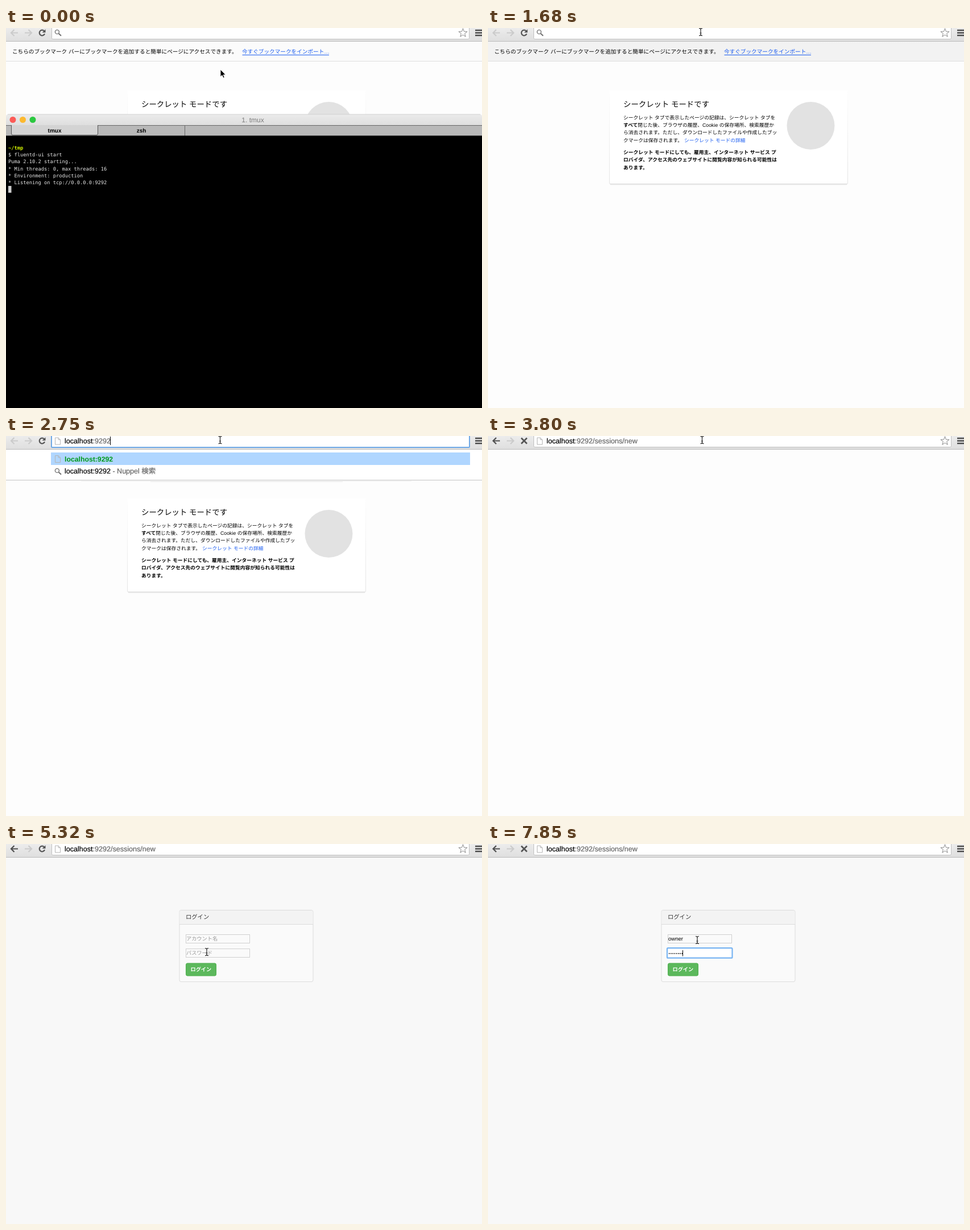
Animation, 837 px wide and 669 px high, one loop 8 s. Source, as an HTML page:

```html
<!DOCTYPE html>
<html lang="ja">
<head>
<meta charset="utf-8">
<title>Sign-in demo</title>
<style>
  html, body { margin: 0; width: 100%; height: 100%; overflow: hidden; background: #fdfdfd; }
  svg { display: block; width: 837px; height: 669px; }
  text { font-family: "Liberation Sans", "Noto Sans CJK JP", "Noto Sans CJK", sans-serif; text-rendering: geometricPrecision; white-space: pre; }
  .mono text { font: 8.72px "DejaVu Sans Mono", monospace; fill: #e6e6e6; }
  .bar { font-size: 9.63px; }
  .body { font-size: 8.75px; }
  .url { font-size: 12.55px; stroke: #000; stroke-width: .2; }
  .form { font-size: 9.2px; }
  .secret { font-size: 6.6px; letter-spacing: .9px; }
  .bold { font-weight: bold; }
  .tab { font-size: 10px; font-weight: bold; text-anchor: middle; }
  .link { fill: #1a5cf0; }
  .dim { fill: #666; stroke: #666; }
  .hint { fill: #999; }
  .line { fill: none; stroke-width: 2.2; }
  .ring { fill: #fff; stroke: #78b4f2; stroke-width: 2.2; }
  .field { fill: #fafafa; stroke: #d0d0d0; }
  .caret { stroke: #000; }
</style>
</head>
<body>
<svg viewBox="0 0 837 669">
  <defs>
    <linearGradient id="chrome" x2="0" y2="1"><stop stop-color="#ececec"/><stop offset="1" stop-color="#dedede"/></linearGradient>
    <linearGradient id="title" x2="0" y2="1"><stop stop-color="#ebebeb"/><stop offset="1" stop-color="#d2d2d2"/></linearGradient>
    <linearGradient id="side" x2="0" y2="1"><stop stop-color="#e4e4e4" stop-opacity="0"/><stop offset="1" stop-color="#e4e4e4"/></linearGradient>
    <g id="arrow"><path d="M14 8.5H2M7.5 3L2 8.5L7.5 14" class="line"/></g>
    <g id="page"><path d="M.5.5H6L9.5 4V12.5H.5ZM6 .5V4H9.5" fill="none" stroke="#b4b4b4"/></g>
    <g id="lens" fill="none" stroke="#707070"><circle cx="4.4" cy="4.4" r="3.5" stroke-width="1.4"/><path d="M7.2 7.2L11.5 11.3" stroke-width="2"/></g>
  </defs>

  <rect width="837" height="669" fill="#fdfdfd"/>

  <g id="newTab">
    <rect x="213" y="112" width="1" height="162" fill="url(#side)"/>
    <rect x="632" y="112" width="1" height="162" fill="url(#side)"/>
    <rect x="214" y="110" width="418" height="164" fill="#fff"/>
    <path d="M214 274.5H632" stroke="#d8d8d8"/>
    <path d="M215 275.8H631" stroke="#ececec" stroke-width="1.5"/>
    <text x="238" y="139" font-size="13.4">シークレット モードです</text>
    <g class="body">
      <text x="238" y="161.3">シークレット タブで表示したページの記録は、シークレット タブを</text>
      <text x="238" y="174.3"><tspan class="bold">すべて</tspan>閉じた後、ブラウザの履歴、Cookie の保存場所、検索履歴か</text>
      <text x="238" y="187.4">ら消去されます。ただし、ダウンロードしたファイルや作成したブッ</text>
      <text x="238" y="200.5">クマークは保存されます。<tspan class="link" x="345">シークレット モードの詳細</tspan></text>
      <g class="bold">
        <text x="238" y="222.3">シークレット モードにしても、雇用主、インターネット サービス プ</text>
        <text x="238" y="235.4">ロバイダ、アクセス先のウェブサイトに閲覧内容が知られる可能性は</text>
        <text x="238" y="248.5">あります。</text>
      </g>
    </g>
    <circle cx="567.5" cy="172" r="42" fill="#e2e2e2"/>
  </g>

  <g id="bookmarks">
    <rect id="bookmarkFill" y="24" width="837" height="35"/>
    <path d="M0 58.5H837" stroke="#dfdfdf"/>
    <text x="11" y="45.3" class="bar">こちらのブックマーク バーにブックマークを追加すると簡単にページにアクセスできます。</text>
    <text x="415" y="45.3" class="bar link">今すぐブックマークをインポート…</text>
    <path d="M415.5 47.5H568" stroke="#1a5cf0"/>
  </g>

  <g id="login">
    <rect y="24" width="837" height="645" fill="#f8f8f8"/>
    <rect x="305" y="116.5" width="235" height="126" rx="3" fill="#fafafa" stroke="#dcdcdc"/>
    <path d="M305.5 141.5V119.5Q305.5 117 308 117H537Q539.5 117 539.5 119.5V141.5" fill="#f3f3f3"/>
    <path d="M305 141.5H540" stroke="#dcdcdc"/>
    <text x="316" y="132.3" font-size="10.3" fill="#333">ログイン</text>
    <rect class="field" x="316.5" y="159.5" width="112" height="15"/>
    <rect class="field" x="316.5" y="184.5" width="112" height="15"/>
    <rect id="accountRing" class="ring" x="315" y="158" width="114.5" height="17.5" rx="1.5"/>
    <rect id="secretRing" class="ring" x="315" y="183.2" width="114.5" height="17.5" rx="1.5"/>
    <text id="accountHint" class="form hint" x="317" y="169.6">アカウント名</text>
    <text id="secretHint" class="form hint" x="317" y="195">パスワード</text>
    <text id="account" x="317" y="169.8" font-size="9.5"></text>
    <text id="secret" class="secret" x="317.6" y="194.5"></text>
    <path id="formCaret" class="caret"/>
    <rect id="button" x="316.5" y="210" width="53" height="22" rx="2.5" stroke="#4cae4c"/>
    <text x="324.5" y="224.2" class="form bold" fill="#fff">ログイン</text>
  </g>

  <g id="dropdown">
    <rect y="24" width="837" height="54" fill="#fff"/>
    <path d="M0 77.5H837" stroke="#cfcfcf"/>
    <path d="M0 78.5H837" stroke="#efefef"/>
    <path d="M132 79.5H713" stroke="#f0f0f0"/>
    <path d="M254 80.5H592" stroke="#ececec"/>
    <rect x="79" y="29" width="737" height="22" fill="#b0d6ff"/>
    <use href="#page" x="86" y="34"/>
    <text x="103" y="44.8" class="bold" font-size="12.25" fill="#009a1a">localhost:9292</text>
    <use href="#lens" x="85.5" y="56.5"/>
    <text x="103" y="66.4" class="url">localhost:9292<tspan class="dim"> - Nuppel 検索</tspan></text>
  </g>

  <g id="toolbar">
    <rect width="837" height="24" fill="url(#chrome)"/>
    <path d="M0 23.5H837" stroke="#bcbcbc"/>
    <path d="M80.5 0V17.5Q80.5 19.5 82.5 19.5H812.5Q814.5 19.5 814.5 17.5V0" fill="#fff" stroke="#c0c0c0"/>
    <path id="urlRing" d="M80 -2V18.5Q80 20 81.5 20H813.5Q815 20 815 18.5V-2" fill="#fff" stroke="#6fa9e6" stroke-width="2"/>
    <use id="back" href="#arrow" x="7" y="0"/>
    <use href="#arrow" stroke="#cbcbcb" transform="translate(47 0) scale(-1 1)"/>
    <g id="reload">
      <path d="M67.2 5.4A4.8 4.8 0 1 0 68 10.2" class="line" stroke="#555"/>
      <path d="M69.5 2.2V8H63.7Z" fill="#555"/>
    </g>
    <path id="stop" d="M58.5 3.5L68.5 13.5M68.5 3.5L58.5 13.5" class="line" stroke="#555" style="stroke-width:2.7"/>
    <use id="urlLens" href="#lens" x="85.5" y="2.5"/>
    <use id="urlPage" href="#page" x="86" y="2.5"/>
    <text class="url" y="13"><tspan id="host" x="103"></tspan><tspan id="path" class="dim"></tspan></text>
    <path id="urlCaret" class="caret"/>
    <path id="star" fill="#fff" stroke="#8a8a8a"/>
    <path d="M825 4H837M825 8.5H837M825 13H837" stroke="#4c4c4c" stroke-width="2.6"/>
  </g>

  <g id="terminal">
    <path d="M0 190V156Q0 152 4 152H833Q837 152 837 156V190Z" fill="url(#title)"/>
    <path d="M3 152H834" stroke="#c9c9c9" stroke-width=".8"/>
    <circle cx="12" cy="161.5" r="5.5" fill="#fc5b57"/>
    <circle cx="29.5" cy="161.5" r="5.5" fill="#fcb92f"/>
    <circle cx="47" cy="161.5" r="5.5" fill="#2bc840"/>
    <text x="434" y="166" font-size="12" text-anchor="middle" fill="#7c7c7c">1. tmux</text>
    <rect y="171" width="837" height="19" fill="#b8b8b8"/>
    <path d="M0 171.5H9M162 171.5H837M314.5 171V190" stroke="#686868"/>
    <path d="M9.5 171V186Q9.5 188.5 12 188.5H159Q161.5 188.5 161.5 186V171" fill="#d3d3d3" stroke="#555"/>
    <text x="85.5" y="183.5" class="tab">tmux</text>
    <text x="238" y="183.5" class="tab">zsh</text>
    <rect y="189.5" width="837" height="479.5"/>
    <g class="mono">
      <text x="4" y="214" style="fill:#d8f800;font-weight:bold">~/tmp</text>
      <text x="4" y="226.2">$ fluentd-ui start</text>
      <text x="4" y="238.4">Puma 2.10.2 starting...</text>
      <text x="4" y="250.6">* Min threads: 0, max threads: 16</text>
      <text x="4" y="262.8">* Environment: production</text>
      <text x="4" y="275">* Listening on tcp://0.0.0.0:9292</text>
    </g>
    <rect x="4" y="278" width="5.5" height="12" fill="#ccc"/>
  </g>

  <g id="pointer">
    <path id="tip" d="M0 0V13L3 10.2L5.1 15L7.2 14.1L5.2 9.4H9.2Z" stroke="#fff" stroke-width=".9"/>
    <path id="beam" d="M-3 -6.5Q0 -6.5 0 -4.5Q0 -6.5 3 -6.5M0 -5V5M-3 6.5Q0 6.5 0 4.5Q0 6.5 3 6.5M-1.5 2H1.5" fill="none" stroke="#222" stroke-width="1.2"/>
    <path id="hand" d="M-1 0Q1 -1.5 1.5 1V5L6 6Q8 6.5 7.5 9L6.5 14H0L-4 8.5Q-4 6.5 -1.2 8Z" fill="#fff" stroke="#222"/>
  </g>
</svg>
<script>
const DURATION = 8000;
const $ = id => document.getElementById(id);
const show = (id, on) => { $(id).style.display = on ? '' : 'none'; };

// Each step overrides only what changes at that time.
const steps = [
  [0, { scene: 'terminal', cursor: 'tip', at: [377, 73], host: '', path: '', focus: '' }],
  [150, { at: [386, 66] }],
  [300, { at: [392, 46] }],
  [450, { at: [388, 24] }],
  [600, { at: [379, 8] }],
  [780, { at: [374, 6] }],
  [1230, { at: [373, 5] }],
  [1680, { scene: 'newTab', cursor: 'beam', at: [374, 7] }],
  [1820, { focus: 'url', caret: true }],
  [2000, { at: [376.5, 7] }],
  [2450, { caret: false }],
  [2750, { host: 'localhost', path: ':9292', suggest: true, caret: true }],
  [3350, { suggest: false, focus: '', caret: false, loading: true }],
  [3800, { scene: 'blank', path: ':9292/sessions/new' }],
  [3950, { cursor: 'tip', at: [373, 40] }],
  [4100, { at: [361, 110] }],
  [4240, { at: [345, 188] }],
  [4390, { at: [336, 227] }],
  [4540, { scene: 'login', at: [335, 236] }],
  [4690, { loading: false, at: [335, 239] }],
  [4990, { cursor: 'hand', at: [340, 222], hover: true }],
  [5140, { cursor: 'tip', at: [346, 203], hover: false }],
  [5320, { cursor: 'beam', at: [353, 190] }],
  [5460, { at: [363, 175] }],
  [5610, { at: [368, 169] }],
  [5910, { focus: 'account', caret: true }],
  [6210, { account: 1 }],
  [6360, { account: 3 }],
  [6510, { account: 4 }],
  [6660, { account: 5 }],
  [6810, { focus: 'secret' }],
  [7110, { secret: 2 }],
  [7260, { secret: 3 }],
  [7400, { secret: 5 }],
  [7550, { secret: 6 }],
  [7700, { secret: 8 }],
  [7850, { loading: true }]
];

const starPoint = (_, i) => {
  const r = i % 2 ? 3.3 : 8, a = i * Math.PI / 5;
  return (803.5 + r * Math.sin(a)).toFixed(2) + ' ' + (8.8 - r * Math.cos(a)).toFixed(2);
};
$('star').setAttribute('d', 'M' + Array.from({ length: 10 }, starPoint).join('L') + 'Z');

function placeCaret(id, on, x, y, height) {
  show(id, on);
  $(id).setAttribute('d', `M${Math.floor(x) + .5} ${y}v${height}`);
}

function draw(s) {
  const { scene, focus, account = 0, secret = 0 } = s;
  const terminal = scene === 'terminal';
  const onNewTab = terminal || scene === 'newTab';
  const typing = focus === 'url';

  show('terminal', terminal);
  show('newTab', onNewTab);
  show('bookmarks', onNewTab);
  show('login', scene === 'login');
  show('dropdown', s.suggest);
  $('bookmarkFill').setAttribute('fill', terminal ? '#fbfbfb' : '#f2f2f2');

  show('urlRing', typing);
  show('urlLens', !s.host);
  show('urlPage', s.host);
  show('star', !s.suggest);
  show('stop', s.loading);
  show('reload', !s.loading);
  $('back').setAttribute('stroke', onNewTab ? '#cbcbcb' : '#505050');
  $('host').textContent = s.host;
  $('path').textContent = s.path;
  placeCaret('urlCaret', typing && s.caret, s.host ? 183.5 : 103, 1, 15);

  $('account').textContent = 'owner'.slice(0, account);
  $('secret').textContent = '•'.repeat(secret);
  show('accountHint', !account);
  show('secretHint', !secret);
  show('accountRing', focus === 'account');
  show('secretRing', focus === 'secret');
  $('button').setAttribute('fill', s.hover ? '#449d44' : '#5cb85c');
  const inSecret = focus === 'secret';
  const caretX = inSecret ? 317.2 + secret * 3.22 : 317.2 + account * 5.2;
  placeCaret('formCaret', s.caret && (inSecret || focus === 'account'), caretX, inSecret ? 187 : 161.5, 10.5);

  for (const shape of ['tip', 'beam', 'hand']) show(shape, shape === s.cursor);
  $('pointer').setAttribute('transform', `translate(${s.at})`);
}

const start = performance.now();
let shown = -1;
function tick() {
  const time = (performance.now() - start) % DURATION;
  const past = steps.filter(([at]) => at <= time);
  if (past.length !== shown) {
    shown = past.length;
    draw(Object.assign({}, ...past.map(([, change]) => change)));
  }
  requestAnimationFrame(tick);
}
tick();
</script>
</body>
</html>
```
